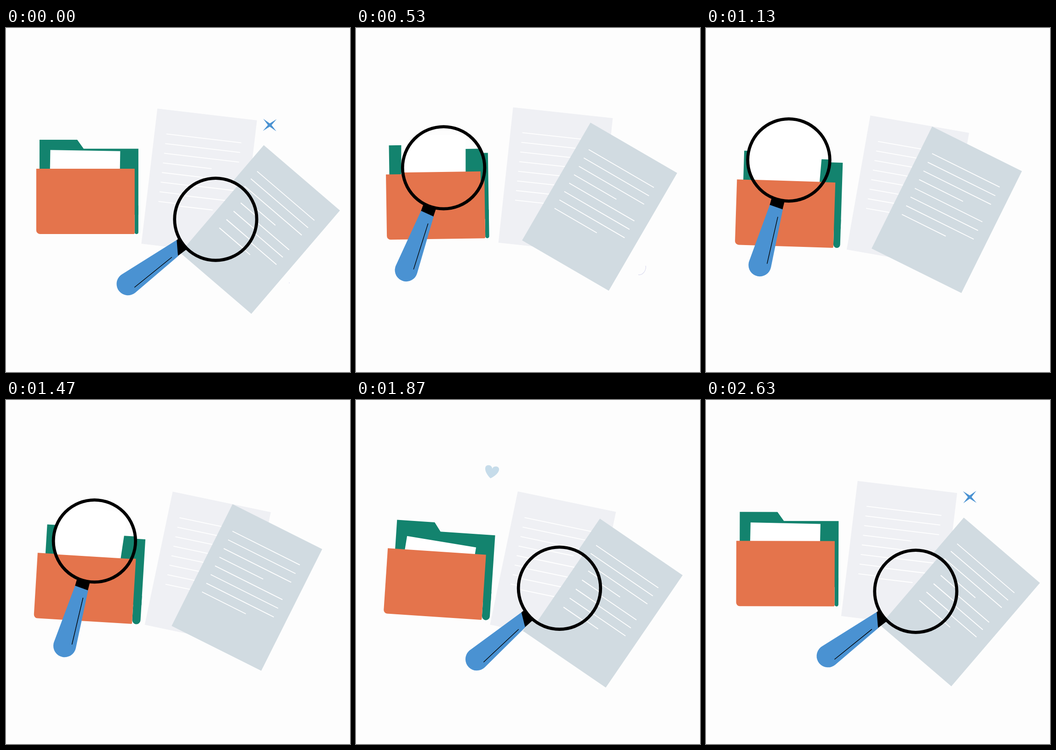
An HTML page with a canvas for the animation above (2.66 s loop, 748x748 px).

```html
<!DOCTYPE html>
<html lang="en">
<head>
<meta charset="utf-8">
<title>Folder and magnifier</title>
<style>
html, body { margin: 0; width: 100%; height: 100%; overflow: hidden; background: #fdfdfd; }
canvas { display: block; width: 748px; height: 748px; }
</style>
</head>
<body>
<canvas id="stage" width="748" height="748"></canvas>
<script>
const ctx = document.getElementById('stage').getContext('2d');
const LOOP = 2660;
const SIZE = 748;
const COLOR = {
  ground: '#fdfdfd', pale: '#eff0f4', grey: '#d1dbe1', orange: '#e4744c',
  green: '#13836e', blue: '#4a92d2', heart: '#c6dcea', curl: '#d9d9ee'
};
const LENS = { radius: 89.3, zoom: 1.13, pivotX: 343, pivotY: 342 };

const rad = deg => deg * Math.PI / 180;
const clamp = (v, lo = 0, hi = 1) => Math.min(hi, Math.max(lo, v));
const mix = (a, b, s) => a + (b - a) * s;
const smooth = u => u * u * (3 - 2 * u);
const cubic = u => u < 0.5 ? 4 * u ** 3 : 1 - 4 * (1 - u) ** 3;
const ramp = (t, from, duration, ease) => ease(clamp((t - from) / duration));

// Slow bobbing: -1 at the lag time, +1 half a loop later
const bob = (t, lag) => -Math.cos(2 * Math.PI * (t - lag) / LOOP);
// 0 = resting over the pages, 1 = searching the folder
const search = t => ramp(t, 0, 800, smooth) - ramp(t, 1410, 850, smooth);
const sweep = t => ramp(t, -30, 720, cubic) - ramp(t, 1300, 725, cubic);

const bezier = (a, b, c, d, s) =>
  a * (1 - s) ** 3 + 3 * b * s * (1 - s) ** 2 + 3 * c * s * s * (1 - s) + d * s ** 3;

function place(x, y, angle, draw) {
  ctx.save();
  ctx.translate(x, y);
  ctx.rotate(rad(angle));
  draw();
  ctx.restore();
}

function polygon(color, points) {
  ctx.fillStyle = color;
  ctx.beginPath();
  points.forEach(p => ctx.lineTo(...p));
  ctx.fill();
}

function roundedRect(color, x, y, w, h, radii) {
  ctx.fillStyle = color;
  ctx.beginPath();
  ctx.roundRect(x, y, w, h, radii);
  ctx.fill();
}

function line(x0, y0, x1, y1, color, width) {
  ctx.strokeStyle = color;
  ctx.lineWidth = width;
  ctx.beginPath();
  ctx.moveTo(x0, y0);
  ctx.lineTo(x1, y1);
  ctx.stroke();
}

function drawPage(x, y, angle, color) {
  place(x, y, angle, () => {
    ctx.fillStyle = color;
    ctx.fillRect(-109, -148, 218, 296);
    for (let i = 0; i < 8; i++) {
      const v = -95.4 + 21.1 * i;
      line(-83, v, i % 4 === 3 ? 23.5 : 81, v, '#fff', 1.8);
    }
  });
}

function drawPages(t) {
  const p = search(t), wave = bob(t, 330);
  drawPage(420 + 19 * p, 348.8 + 19.5 * wave, 9 + 3.15 * wave, COLOR.pale);
  drawPage(547 - 23.5 * p, 452 - 62.8 * p + 19.5 * wave, 40.6 - 14.2 * p, COLOR.grey);
}

function drawFolder(t) {
  const p = search(t), wave = bob(t, 400);
  const back = 10 + 3 * p + 5 * wave;
  const spine = back + 1;
  const swing = Math.max(0, (wave + 0.6) / 1.5);
  const rise = p ** 3;
  place(172.2 - wave, 382.6 + 19.5 * p + 9.6 * wave, 1.45 + 2.45 * wave, () => {
    ctx.translate(-107, -71);
    polygon(COLOR.green, [
      [back, -63], [back + 82, -63], [back + 96, -43.5],
      [back + 215, -43.5], [back + 215, 100], [back, 100]
    ]);
    roundedRect(COLOR.green, 214, 80, spine, 62, [0, 0, spine / 2, spine / 2]);
    place(30.5 + 8.5 * swing + 10 * rise, -41 + 18 * swing - 80 * rise, 0.9 + 4.5 * swing, () => {
      ctx.fillStyle = '#fff';
      ctx.fillRect(0, 0, 152, 160);
    });
    roundedRect(COLOR.orange, 0, 0, 214, 142, [0, 0, 2, 8]);
  });
}

function drawScene(t) {
  drawFolder(t);
  drawPages(t);
}

function drawMagnifier(t) {
  const s = sweep(t);
  const x = bezier(456, 339, 260, 180, s);
  const y = bezier(416, 353, 424, 287, s);
  const turn = sweep(t - 65);

  ctx.save();
  ctx.beginPath();
  ctx.arc(x, y, LENS.radius, 0, Math.PI * 2);
  ctx.clip();
  ctx.fillStyle = COLOR.ground;
  ctx.fillRect(0, 0, SIZE, SIZE);
  ctx.translate(LENS.pivotX, LENS.pivotY);
  ctx.scale(LENS.zoom, LENS.zoom);
  ctx.translate(-LENS.pivotX, -LENS.pivotY);
  drawScene(t);
  ctx.restore();

  place(x, y, mix(143.6, 105.4, turn), () => {
    const slant = (1 - turn) ** 2;
    const near = 105 - 10 * slant, far = 107 + 6.5 * slant;
    polygon('#000', [[87, 14], [near + 1, 14], [far + 1, -15.5], [87, -15]]);
    ctx.fillStyle = COLOR.blue;
    ctx.beginPath();
    ctx.moveTo(far, -16);
    ctx.arc(237, 0, 24.7, rad(-94), rad(94));
    ctx.lineTo(near, 14);
    ctx.fill();
    line(125.5, -9.8, 230, -14.4, '#000', 1.4);
  });

  ctx.strokeStyle = '#000';
  ctx.lineWidth = 6.8;
  ctx.beginPath();
  ctx.arc(x, y, LENS.radius, 0, Math.PI * 2);
  ctx.stroke();
}

function drawStar(t) {
  const age = (t - 2230 + LOOP) % LOOP;
  if (age > 590) return;
  const size = clamp(age / 120);
  place(573.5, 211, (age - 415) * 0.1, () => {
    ctx.scale(size, size * 0.9);
    ctx.fillStyle = COLOR.blue;
    ctx.beginPath();
    for (let i = 0; i < 8; i++) {
      const r = i % 2 ? 4 : 20.5, a = rad(45 * i + 45);
      ctx.lineTo(r * Math.cos(a), r * Math.sin(a));
    }
    ctx.fill();
  });
}

function drawHeart(t) {
  if (t < 1530 || t >= 2150) return;
  const size = clamp((t - 1500) / 120);
  place(295, 156, 10, () => {
    ctx.scale(size, size);
    ctx.fillStyle = COLOR.heart;
    ctx.beginPath();
    ctx.moveTo(0, 14.5);
    ctx.bezierCurveTo(-18, 2, -19, -13, -8, -13);
    ctx.bezierCurveTo(-3, -13, 0, -9, 0, -6);
    ctx.bezierCurveTo(0, -9, 3, -13, 8, -13);
    ctx.bezierCurveTo(19, -13, 18, 2, 0, 14.5);
    ctx.fill();
  });
}

// The curl draws itself on, then runs off at its far end
function drawCurl(t) {
  const reach = t / 310 + 0.02, length = 100;
  if (reach >= 2) return;
  ctx.save();
  ctx.strokeStyle = COLOR.curl;
  ctx.lineWidth = 1.2;
  ctx.setLineDash([length, length]);
  ctx.lineDashOffset = length * (1 - reach);
  ctx.beginPath();
  ctx.moveTo(615, 554);
  ctx.bezierCurveTo(628, 556, 636, 548, 632, 536);
  ctx.bezierCurveTo(629, 526, 618, 520, 610, 526);
  ctx.bezierCurveTo(604, 533, 614, 540, 622, 535);
  ctx.bezierCurveTo(628, 531, 631, 524, 630, 517);
  ctx.stroke();
  ctx.restore();
}

function render(now) {
  const t = now % LOOP;
  ctx.fillStyle = COLOR.ground;
  ctx.fillRect(0, 0, SIZE, SIZE);
  drawScene(t);
  drawCurl(t);
  drawStar(t);
  drawHeart(t);
  drawMagnifier(t);
}

let start;
function tick(now) {
  start ??= now;
  render(now - start);
  requestAnimationFrame(tick);
}
render(0);
requestAnimationFrame(tick);
</script>
</body>
</html>
```
